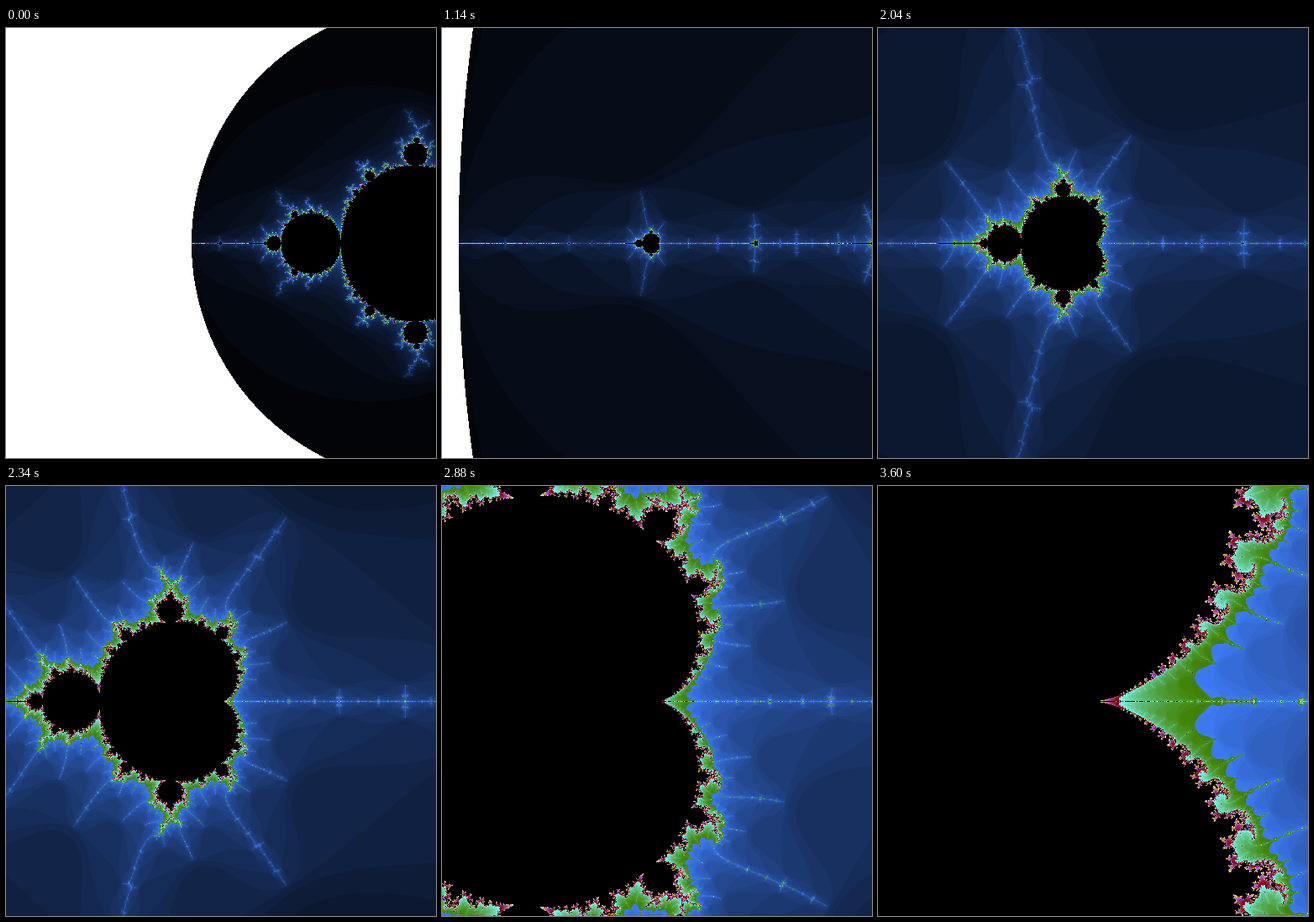
These frames come from a looping animation (512x512 px, 3660 ms). An HTML page with a canvas:

```html
<!DOCTYPE html>
<html lang="en">
<head>
<meta charset="utf-8">
<title>Fractal zoom</title>
<style>
  html, body { margin: 0; width: 100%; height: 100%; overflow: hidden; background: #fff; }
  canvas { display: block; width: 512px; height: 512px; }
</style>
</head>
<body>
<canvas id="stage" width="512" height="512"></canvas>
<script>
const SIZE = 512;
const HALF = SIZE / 2;
const CENTER = -1.75;
const MAX_ITER = 128;
const STEP_MS = 60;
const LOOP_MS = 3660;
const AXIS_OFFSET = 1e-16; // keeps the real axis just outside the set

const ctx = document.getElementById('stage').getContext('2d');
const image = ctx.createImageData(SIZE, SIZE);
const pixels = new Uint32Array(image.data.buffer);

const rgb = (r, g, b) => (255 << 24 | b << 16 | g << 8 | r) >>> 0;

// Each channel wraps at its own rate as the escape count grows.
const palette = Uint32Array.from({ length: MAX_ITER + 1 }, (_, n) =>
  rgb(n * 2 & 255, n * 4 & 255, n * 8 & 255));
palette[0] = rgb(255, 255, 255);
palette[MAX_ITER] = rgb(0, 0, 0);

function escapeCount(cx, cy) {
  let x = cx, y = cy, n = 0;
  while (n < MAX_ITER) {
    const xx = x * x, yy = y * y;
    if (xx + yy > 4) break;
    y = 2 * x * y + cy;
    x = xx - yy + cx;
    n++;
  }
  return n;
}

function draw(step) {
  const unit = 4 * Math.pow(0.9, step + 1) / SIZE;
  for (let row = 0; row <= HALF; row++) {
    const cy = row === HALF ? AXIS_OFFSET : (row - HALF) * unit;
    const start = row * SIZE;
    for (let col = 0; col < SIZE; col++) {
      pixels[start + col] = palette[escapeCount(CENTER + (col - HALF) * unit, cy)];
    }
    // The lower half mirrors the upper one.
    if (row > 0 && row < HALF) {
      pixels.copyWithin((SIZE - row) * SIZE, start, start + SIZE);
    }
  }
  ctx.putImageData(image, 0, 0);
}

let shown = -1;

function tick() {
  const time = performance.now() % LOOP_MS;
  const step = Math.max(0, Math.floor(time / STEP_MS) - 1);
  if (step !== shown) {
    draw(step);
    shown = step;
  }
  requestAnimationFrame(tick);
}

tick();
</script>
</body>
</html>
```
